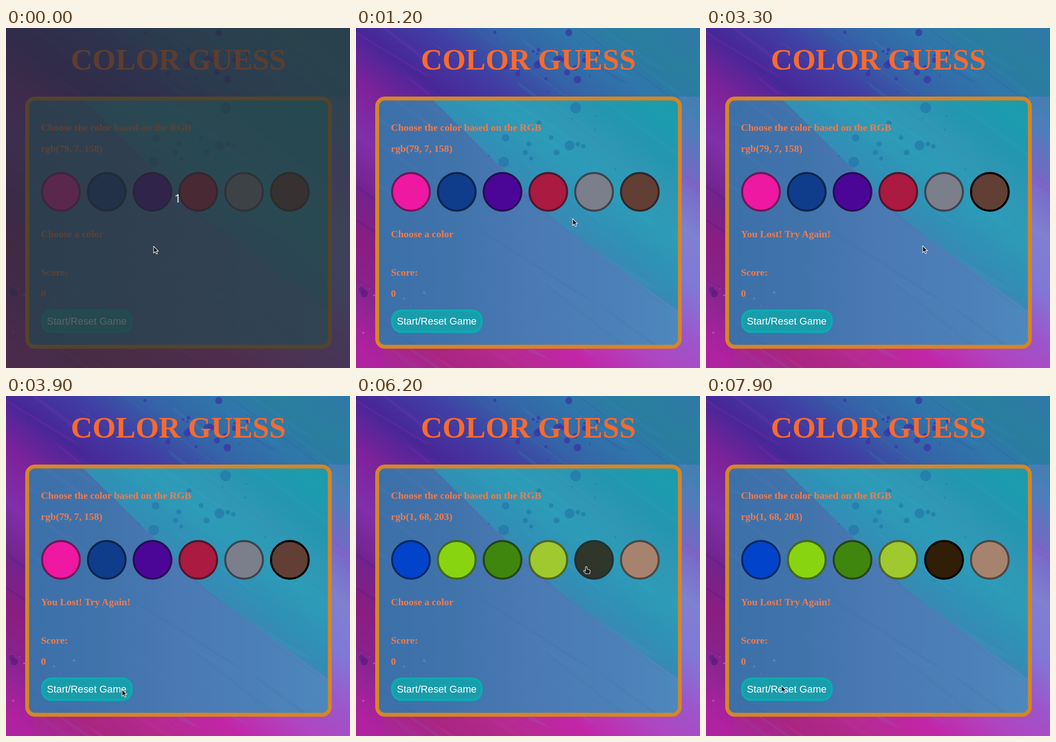
An HTML page with a canvas for the animation above (8 s loop, 753 by 744 pixels).

```html
<!DOCTYPE html>
<html lang="en">
<head>
<meta charset="utf-8">
<title>Color Guess</title>
<style>
  html, body { margin: 0; width: 100%; height: 100%; overflow: hidden; background: #43259a; }
  canvas, svg { position: absolute; left: 0; top: 0; width: 753px; height: 744px; }
  .serif { font: bold 21.8px "Liberation Serif", serif; fill: #f07c4e; }
  .title { font-size: 65.4px; fill: #f96a2e; text-anchor: middle; }
  .button { font: 21.8px "Liberation Sans", sans-serif; fill: #fff; }
  .count { font: 26px "Open Sans", sans-serif; fill: #fff; text-anchor: middle; }
  .cursor { fill: #1c1c1c; stroke: #fff; stroke-width: 1.1; stroke-linejoin: round; }
</style>
</head>
<body>
<canvas id="paint" width="753" height="744"></canvas>
<svg viewBox="0 0 753 744">
  <text class="serif title" x="377.3" y="90.6">COLOR GUESS</text>
  <rect x="46.3" y="154.3" width="662.5" height="543.3" rx="17" fill="none" stroke="#d88522" stroke-width="8.5"/>
  <g class="serif">
    <text x="76.5" y="225">Choose the color based on the RGB</text>
    <text id="rgb" x="76.5" y="271"></text>
    <text id="message" x="76.5" y="458"></text>
    <text x="76.5" y="542">Score:</text>
    <text x="76.5" y="588">0</text>
  </g>
  <g id="swatches"></g>
  <rect x="79.3" y="618.3" width="195.5" height="46.5" rx="20" fill="#1a9cab" stroke="#08aeb0" stroke-width="4.8"/>
  <text class="button" x="89.5" y="648.6">Start/Reset Game</text>
  <g id="countdown">
    <rect width="753" height="744" fill="rgb(40,46,48)" fill-opacity=".75"/>
    <text class="count" x="376" y="381.5">1</text>
  </g>
  <g id="cursor" class="cursor">
    <path id="arrow" d="M.5 .5V15.5L4 12.4L6.6 17.6L9.2 16.4L6.7 11.4H11.3Z"/>
    <path id="hand" d="M-1.7 1.5Q0 -.8 1.7 1.5V6L7 7.2Q9 7.8 8.6 10.4L7.4 16H-1L-5.6 10.5Q-6 8.3 -3.8 8.8L-1.7 10.4Z"/>
  </g>
</svg>
<script>
const $ = id => document.getElementById(id);
const W = 753, H = 744, LOOP = 8000;

// ---- painted background ----
const ctx = $('paint').getContext('2d');
let seed = 11;
const rand = () => (seed = (seed * 16807) % 2147483647) / 2147483647;
const between = (a, b) => a + (b - a) * rand();

// Run a drawing function inside an SVG-style path.
function within(area, fn) {
  ctx.save();
  ctx.clip(new Path2D(area));
  fn();
  ctx.restore();
}

// Evenly spaced colours across the brush direction; a and b are values of x + slant * y.
function wash(area, a, b, colors, slant = -1.3) {
  const k = 1 / (1 + slant * slant);
  const fill = ctx.createLinearGradient(a * k, a * k * slant, b * k, b * k * slant);
  colors.split(' ').forEach((c, i, all) => fill.addColorStop(i / (all.length - 1), '#' + c));
  ctx.fillStyle = fill;
  ctx.fill(new Path2D(area));
}

// Ragged diagonal brush strokes running down to the right.
function strokes(area, count, colors, alpha) {
  within(area, () => {
    for (let i = 0; i < count; i++) {
      const x = between(-150, W), y = between(-100, H);
      const len = between(60, 330), slope = between(.58, .78), thick = between(1, 13);
      ctx.globalAlpha = between(.25, 1) * alpha;
      ctx.fillStyle = '#' + colors.split(' ')[i % 3];
      ctx.beginPath();
      ctx.moveTo(x, y);
      ctx.lineTo(x + len, y + len * slope);
      ctx.lineTo(x + len * .85, y + len * slope * .85 + thick);
      ctx.lineTo(x + len * .1, y + len * slope * .1 + thick * .6);
      ctx.fill();
    }
  });
}

// Paint drops, mostly small, crowding around a centre.
function spatter(color, count, cx, cy, w, h, size) {
  ctx.fillStyle = color;
  for (let i = 0; i < count; i++) {
    const x = cx + w * (rand() + rand() - 1), y = cy + h * (rand() + rand() - 1);
    ctx.beginPath();
    ctx.arc(x, y, 1 + size * rand() ** 1.6, 0, 7);
    ctx.fill();
  }
}

function paint() {
  const page = 'M0 0H753V744H0Z', corner = 'M60 744V698H706V150H753V744Z';
  const top = 'M160 0H753V150H160Z', left = 'M0 0H160V744H0Z';
  const panel = 'M63 154H692Q709 154 709 171V681Q709 698 692 698H63Q46 698 46 681V171Q46 154 63 154Z';
  const band = 'M165 154L440 425L709 622V171Q709 154 692 154Z';

  wash(page, -900, 750, 'b022a0 8a2590 8a1d80 72248c 8030a8 7e229a 482798 413da4 3563a8 2f76aa 2a7f9e 3078a8');
  wash(corner, -900, 600, 'a9269c a82680 b52a90 c226a8 b044c0 9c56cb 8078d6 7f80d0 7668c6 4a80b8 3b7fa8');
  strokes(left, 70, 'b52cae 4d1a86 8e3ac0', .24);
  strokes(top, 70, '2a98ac 3a48a8 4a86c0', .24);
  strokes(corner, 110, 'd22aa8 8a60c8 9a58c8', .25);
  spatter('rgba(60,52,165,.75)', 26, 430, 75, 150, 75, 8);
  spatter('rgba(95,28,130,.7)', 4, 20, 580, 20, 15, 8);
  spatter('#d040b8', 6, 50, 640, 50, 110, 2);

  wash(panel, 46, 709, '3c70a9 4173ab 4b79b3 4c7fb7 4c89bd', 0);
  strokes(panel, 70, '5a7cba 38689f 4a8cc0', .15);
  within(panel, () => {
    wash(band, -110, 520, '3889b4 2f92b6 2d9cb8 2f97b4 2496b0 1c9cae 1b9baa');
    strokes(band, 70, '18a0ae 3a84b4 46a8c4', .17);
  });
  spatter('rgba(32,112,165,.55)', 18, 435, 245, 150, 75, 11);
  spatter('rgba(115,125,180,.7)', 3, 130, 595, 60, 20, 3);
}
paint();

// ---- game ----
const rounds = [
  { rgb: 'rgb(79, 7, 158)', pick: 5, clicked: 2300,
    colors: ['#ef18a3', '#103c8c', '#4b0698', '#ab1a40', '#7b7f8c', '#623f35'] },
  { rgb: 'rgb(1, 68, 203)', pick: 4, clicked: 7100,
    colors: ['#0144cb', '#89d410', '#3f860e', '#9fc92e', '#301e07', '#a6836e'] }
];
const RESET = 4300, CY = 358.5;
const centre = i => 120.3 + 100.2 * i;

function add(parent, tag, attrs = {}) {
  const el = document.createElementNS('http://www.w3.org/2000/svg', tag);
  for (const key in attrs) el.setAttribute(key, attrs[key]);
  return parent.appendChild(el);
}
const swatches = rounds[0].colors.map((_, i) => {
  const group = add($('swatches'), 'g'), at = { cx: centre(i), cy: CY };
  return {
    group,
    disc: add(group, 'circle', { ...at, r: 43.3 }),
    ring: add(group, 'circle', { ...at, r: 41.3, fill: 'none', 'stroke-width': 4.4 })
  };
});

// Pointer glides: begin, finish, end point, optional bend point
const glides = [
  [600, 800, 316, 477],
  [800, 2000, 606, 373, 454, 420],
  [3200, 3700, 246, 645, 420, 520],
  [3700, 3900, 253.5, 641.5],
  [4800, 5300, 253, 515, 232, 590],
  [5300, 5600, 434, 430, 310, 450],
  [5700, 6200, 504, 373, 465, 400],
  [7400, 7800, 162, 634, 330, 530],
  [7800, 7900, 164.5, 633]
];
const easeOut = u => 1 - (1 - u) ** 2;

function pointer(t) {
  let x = 322.5, y = 477;
  for (const [begin, finish, ex, ey, bx = ex, by = ey] of glides) {
    if (t <= begin) break;
    const s = easeOut(Math.min(1, (t - begin) / (finish - begin)));
    const bend = (a, b, c) => a * (1 - s) ** 2 + 2 * b * s * (1 - s) + c * s * s;
    x = bend(x, bx, ex);
    y = bend(y, by, ey);
  }
  return [x, y];
}
const show = (id, on) => $(id).setAttribute('visibility', on ? 'visible' : 'hidden');

function draw(t) {
  const round = rounds[t < RESET ? 0 : 1], lost = t >= round.clicked;
  const [x, y] = pointer(t);
  let over = false;
  swatches.forEach(({ group, disc, ring }, i) => {
    const hover = Math.hypot(x - centre(i), y - CY) < 43.5;
    over = over || hover;
    group.setAttribute('opacity', hover ? .8 : 1);
    disc.setAttribute('fill', round.colors[i]);
    ring.setAttribute('stroke', lost && i === round.pick ? '#000' : 'rgba(12,18,24,.54)');
  });
  $('rgb').textContent = round.rgb;
  $('message').textContent = lost ? 'You Lost! Try Again!' : 'Choose a color';
  show('countdown', t < 100);
  show('arrow', !over);
  show('hand', over);
  $('cursor').setAttribute('transform', `translate(${x} ${y})`);
}

// The screen refreshes ten times a second.
let start, last = -1;
function tick(now) {
  start ??= now;
  const t = Math.floor((now - start) % LOOP / 100) * 100;
  if (t !== last) draw(last = t);
  requestAnimationFrame(tick);
}
draw(0);
requestAnimationFrame(tick);
</script>
</body>
</html>
```
